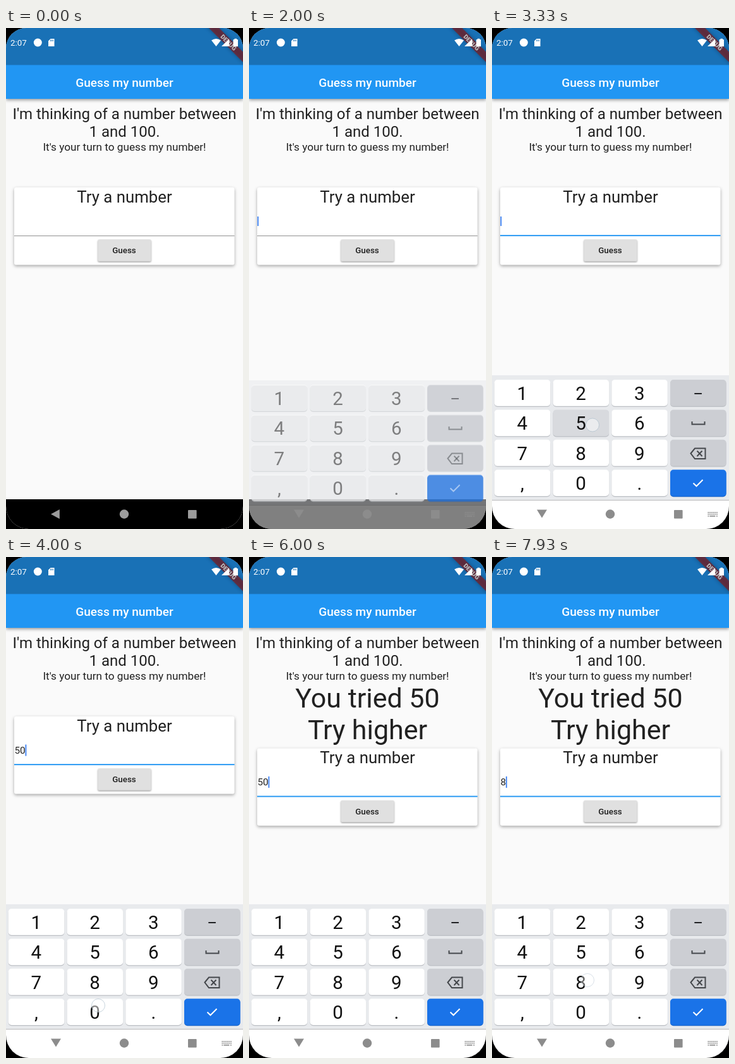
An HTML page with a canvas for the animation above (8000 ms loop, 375 by 792 pixels).

```html
<!DOCTYPE html>
<html lang="en">
<head>
<meta charset="utf-8">
<title>Guess my number</title>
<style>
html, body { margin: 0; width: 100%; height: 100%; overflow: hidden; background: #000; }
canvas { display: block; width: 375px; height: 792px; }
</style>
</head>
<body>
<canvas id="stage"></canvas>
<script>
const W = 375, H = 792, LOOP = 8000, MID = W / 2;
const U = 0.955; // pixels per dp
const LINE = 45 * 1.172 * U;
const INK = 'rgba(0,0,0,0.87)', BLUE = '#2196f3';

const canvas = document.getElementById('stage');
const dpr = window.devicePixelRatio || 1;
canvas.width = W * dpr;
canvas.height = H * dpr;
const c = canvas.getContext('2d');

const TYPED = [[0, ''], [3530, '5'], [4000, '50'], [6930, '5'], [7130, ''], [7930, '8']];
const CARET = [[0, 0], [1600, 1], [2730, 0], [3200, 1], [4470, 0], [5000, 1],
  [5470, 0], [6000, 1], [6470, 0], [6930, 1], [7600, 0], [7930, 1]];
const TAPS = [
  { from: 930, to: 1130, x: 158.5, y: 312.5 },
  { from: 3270, to: 3670, x: 159, y: 627.5, key: '5', up: 3530 },
  { from: 3930, to: 4200, x: 146, y: 709, key: '0', up: 4000 },
  { from: 4670, to: 4930, x: 186, y: 354 },
  { from: 6870, to: 7070, x: 333.5, y: 677 },
  { from: 7070, to: 7270, x: 333.5, y: 677 },
  { from: 7670, to: 8060, x: 151, y: 669, key: '8', up: 7930 }
];
const KEYS = ['123-', '456_', '789<', ',0.>'];

// Latest value of a stepped track
function at(track, t) {
  let v = track[0][1];
  for (const [time, value] of track) if (t >= time) v = value;
  return v;
}

function rect(x, y, w, h, fill) {
  c.fillStyle = fill;
  c.fillRect(x, y, w, h);
}

function box(x, y, w, h, r, fill) {
  c.beginPath();
  c.roundRect(x, y, w, h, r);
  c.fillStyle = fill;
  c.fill();
}

function disc(x, y, r, fill) {
  c.beginPath();
  c.arc(x, y, r, 0, Math.PI * 2);
  c.fillStyle = fill;
  c.fill();
}

function path(points, close) {
  c.beginPath();
  points.forEach(([x, y]) => c.lineTo(x, y));
  if (close) c.closePath();
}

function poly(points, fill) {
  path(points, true);
  c.fillStyle = fill;
  c.fill();
}

function line(points, color, width, close) {
  path(points, close);
  c.strokeStyle = color;
  c.lineWidth = width;
  c.stroke();
}

function text(s, x, y, size, color = INK, weight = 400, align = 'center') {
  c.font = `${weight} ${size}px Roboto, "Noto Sans", sans-serif`;
  c.textAlign = align;
  c.fillStyle = color;
  c.fillText(s, x, y);
}

function shadowed(blur, dy, alpha, draw) {
  c.save();
  c.shadowColor = `rgba(0,0,0,${alpha})`;
  c.shadowBlur = blur * dpr;
  c.shadowOffsetY = dy * dpr;
  draw();
  c.restore();
}

function ribbon() {
  c.save();
  c.translate(W, 0);
  c.rotate(Math.PI / 4);
  shadowed(6, 0, 0.5, () => rect(-44, 28 * U, 88, 12 * U, 'rgba(183,28,28,0.63)'));
  text('DEBUG', 0, 34 * U + 3.4, 10.2 * U, '#fff', 900);
  c.restore();
}

function statusIcons() {
  text('2:07', 7, 28, 14 * U, '#fff', 400, 'left');
  disc(50.3, 23, 6.5, '#fff');
  poly([[70.5, 17], [76.5, 17], [76.5, 29], [67, 29], [67, 20.5]], '#fff');
  for (let i = 0; i < 3; i++) rect(70 + i * 1.9, 18.5, 0.9, 2.6, '#1971b6');
  c.beginPath();
  c.moveTo(332.5, 29);
  c.lineTo(325, 19.5);
  c.quadraticCurveTo(332.5, 14.5, 340, 19.5);
  c.closePath();
  c.fillStyle = '#fff';
  c.fill();
  poly([[341, 29], [353, 29], [353, 17]], '#fff');
  box(359.5, 18, 7.5, 11.2, 1, '#fff');
  rect(361.5, 16.8, 3.5, 1.5, '#fff');
}

function header() {
  shadowed(5, 2, 0.4, () => rect(0, 0, W, 112, BLUE));
  text('Guess my number', MID, 93, 20 * U, '#fff', 500);
  ribbon();
  rect(0, 0, W, 58.5, 'rgba(0,0,0,0.25)');
  statusIcons();
}

function card(t, shift) {
  const y = 252.1 + shift, x = 14 * U - 0.4;
  const w = W - 2 * x - 0.5, rule = y + 76;
  shadowed(5, 2, 0.34, () => box(x, y, w, 122.3, 3, '#fff'));
  text('Try a number', MID, y + 24, 27 * U);

  const typed = at(TYPED, t);
  text(typed, 13.4, y + 58.8, 16 * U, INK, 400, 'left');
  if (at(CARET, t)) {
    const cx = 13.3 + c.measureText(typed).width;
    const tall = typed ? 18 : 15;
    rect(cx, y + 53.4 - tall / 2, 1.9, tall, '#4285f4');
  }
  if (t >= 2330) rect(x, rule - 0.9, w, 1.9, BLUE);
  else rect(x, rule, w, 1, '#8f8f8f');

  shadowed(2.5, 1.5, 0.36, () => box(145.3, y + 82.2, 84.3, 34.4, 2, '#e0e0e0'));
  text('Guess', MID - 0.5, y + 104.2, 14 * U, INK, 500);
}

function page(t) {
  rect(0, 0, W, H, '#fafafa');
  text("I'm thinking of a number between", MID, 144.1, 24);
  text('1 and 100.', MID, 172.1, 24);
  text("It's your turn to guess my number!", MID, 193.8, 18 * U);
  const guessed = t >= 4800;
  if (guessed) {
    text('You tried 50', MID, 237.8, 45 * U);
    text('Try higher', MID, 237.8 + LINE, 45 * U);
  }
  card(t, guessed ? LINE : 0);
  header();
}

const GLYPH = {
  '-': () => rect(320.3, 577, 11.6, 2, '#202124'),
  '_': () => line([[316.5, 622], [316.5, 626.5], [336.5, 626.5], [336.5, 622]], '#45484c', 2),
  '<': () => {
    line([[314.5, 672.5], [321, 664.5], [337.5, 664.5], [337.5, 681], [321, 681]], '#45484c', 2, true);
    line([[324.5, 668.5], [332.5, 677]], '#45484c', 2);
    line([[332.5, 668.5], [324.5, 677]], '#45484c', 2);
  },
  '>': () => line([[318.5, 719.5], [323.5, 724.3], [333.5, 714.3]], '#fff', 2)
};

function keyboard(t) {
  rect(0, 549, W, 197.5, '#e8eaed');
  rect(0, 746.5, W, 60, '#fff');
  const held = TAPS.find(p => p.key && t >= p.from + 60 * (p.key !== '0') && t < p.up);
  KEYS.forEach((row, r) => [...row].forEach((k, i) => {
    const x = 3.8 + i * 92.75, y = 556 + r * 47.4;
    let fill = i < 3 ? '#fff' : '#ccced3';
    if (k === '>') fill = '#1a73e8';
    if (held && held.key === k) fill = '#d8dade';
    box(x, y + 1, 88.5, 42, 5, k === '>' ? '#1765cc' : '#bcbfc4');
    box(x, y, 88.5, 41.8, 5, fill);
    if (GLYPH[k]) GLYPH[k]();
    else text(k, x + 44, y + 32, 29.5, '#111');
  }));
}

function nav(t) {
  const grey = t >= 2000 ? '#8c8c8c' : '#9c9c9c';
  poly(t >= 2000 ? [[71, 761.5], [87, 761.5], [79, 774.5]]
                 : [[84.8, 761], [84.8, 776], [71, 768.5]], grey);
  disc(187, 768.5, 7.2, grey);
  box(288, 762, 13.6, 13.6, 1, grey);
  if (t < 1400) return;
  for (let r = 0; r < 2; r++)
    for (let i = 0; i < 6; i++) rect(341.5 + i * 2.7, 765 + r * 2.8, 1.7, 1.7, grey);
  rect(341.5, 770.8, 1.7, 1.7, grey);
  rect(344.4, 770.8, 9, 1.7, grey);
  rect(355, 770.8, 1.7, 1.7, grey);
}

function touch(t) {
  for (const p of TAPS) {
    if (t < p.from || t >= p.to) continue;
    c.globalAlpha = Math.min(1, (p.to - t) / 180);
    disc(p.x, p.y, 10.5, 'rgba(255,255,255,0.5)');
    c.strokeStyle = 'rgba(165,185,200,0.6)';
    c.lineWidth = 1;
    c.stroke();
    c.globalAlpha = 1;
  }
}

function draw(t) {
  c.setTransform(dpr, 0, 0, dpr, 0, 0);
  rect(0, 0, W, H, '#000');
  c.save();
  c.beginPath();
  c.roundRect(0, 0, W, H, [32, 32, 36, 36]);
  c.clip();
  page(t);
  rect(0, 745, W, 47, '#000');
  if (t >= 1670) {
    const opening = t < 2270;
    c.save();
    c.globalAlpha = opening ? 0.5 : 1;
    c.translate(0, opening ? 8 : 0);
    keyboard(t);
    c.restore();
  }
  nav(t);
  touch(t);
  c.restore();
}

let start;
function tick(now) {
  if (start === undefined) start = now;
  draw((now - start) % LOOP);
  requestAnimationFrame(tick);
}
requestAnimationFrame(tick);
</script>
</body>
</html>
```
